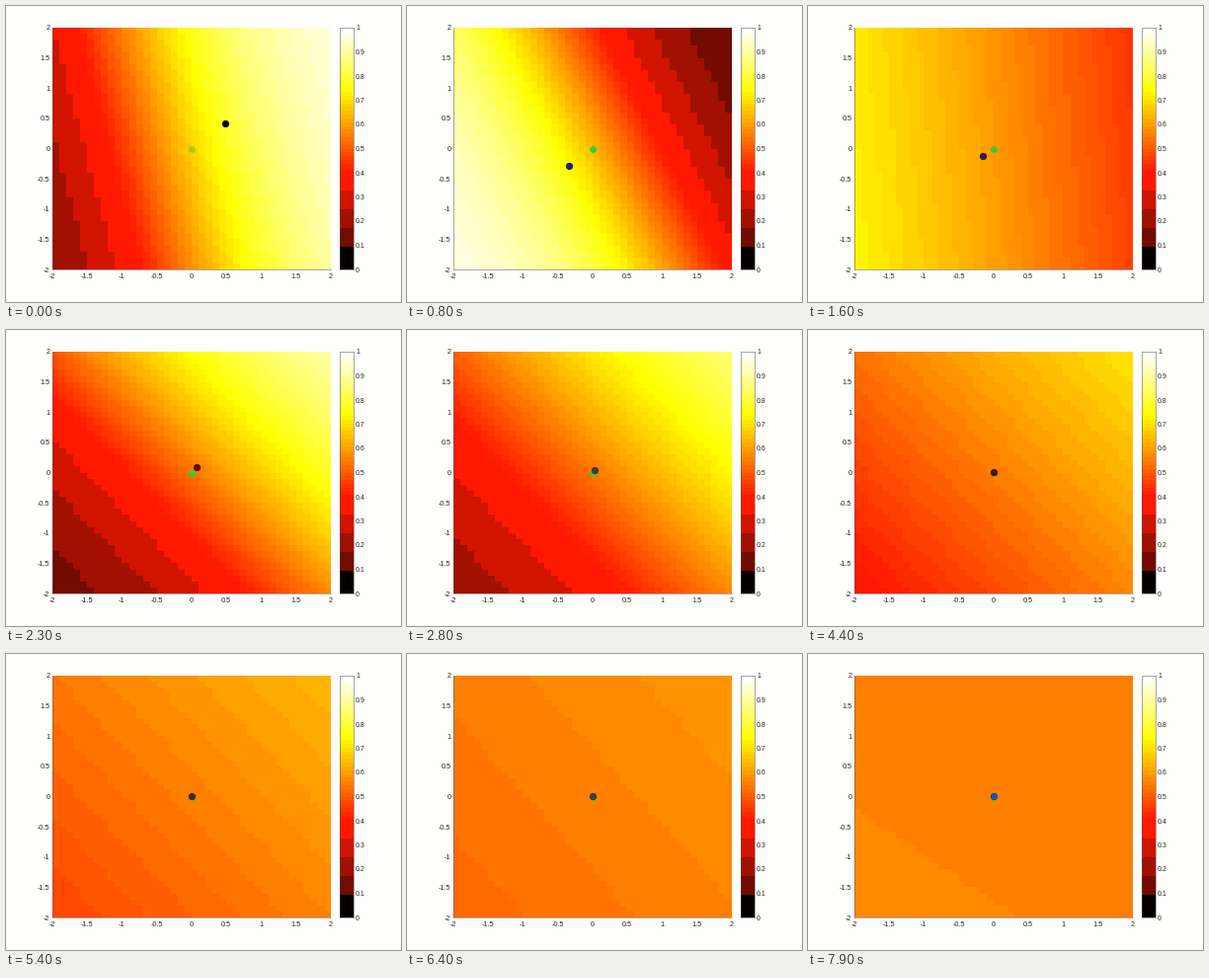
A matplotlib script that plays this animation: 400 px wide and 300 px high, repeating every 8 s.

```python
import numpy as np
import matplotlib.pyplot as plt
from matplotlib.animation import FuncAnimation
from matplotlib.colors import LinearSegmentedColormap, ListedColormap

W, H, DPI = 400, 300, 100
PX = 72 / DPI
STEP_MS, FRAMES = 100, 80
INK = "#262626"
PAPER = "#fefefc"

plt.rcParams["font.family"] = "Liberation Sans"
plt.rcParams["axes.unicode_minus"] = False

# Weight x, weight y, bias, dot x, dot y at the turning points and at rest.
START = np.array([0.95, 0.22, 0.74, 0.49, 0.41])
SWING = np.array([-0.97, -0.43, 0.58, -0.34, -0.29])
RETURN = np.array([0.56, 0.48, 0.14, 0.08, 0.09])
REST = np.array([-0.0575, -0.053, 0.242, 0, 0.01])
DECAY = np.array([0.045, 0.045, 0.045, 0.2, 0.2])
T_SWING, T_RETURN = 8, 23

# Slow first updates, then a steady pace (units of one step).
TICKS = np.r_[0, 1, 3, 5, T_SWING, np.round(np.arange(12, FRAMES, 1.625))]

DOT_COLORS = LinearSegmentedColormap.from_list("dot", [
    (0.00, "#000000"), (0.10, "#1e1e8c"), (0.29, "#5a0c14"),
    (0.43, "#1e7873"), (0.56, "#4b140f"), (0.81, "#324650"),
    (1.00, "#1e50be")])


def hot_map(n=64):
    """Black-red-yellow-white ramp whose dark end is in coarse bands."""
    k = np.arange(n)
    third = 3 * n // 8
    band = np.floor((k - 6) / 4.67)
    red = np.where(k < 6, 0.02, np.clip(0.45 + 0.185 * band, 0, 1))
    green = np.clip((k + 1 - third) / third, 0, 1)
    green = np.maximum(green, np.where(k < 6, 0, 0.1 * red))
    blue = np.clip((k + 1 - 2 * third) / (n - 2 * third), 0, 1)
    return ListedColormap(np.stack([red, green, blue], axis=1))


def ease(a, b, u):
    return a + (b - a) * (1 - np.cos(np.pi * u)) / 2


def state(t):
    """Two wide swings, then an exponential settling."""
    if t < T_SWING:
        return ease(START, SWING, t / T_SWING)
    if t < T_RETURN:
        return ease(SWING, RETURN, (t - T_SWING) / (T_RETURN - T_SWING))
    return REST + (RETURN - REST) * np.exp(-DECAY * (t - T_RETURN))


def add_axes(x0, y0, x1, y1):
    """Axes from pixel corners, y counted downward."""
    return fig.add_axes([x0 / W, 1 - y1 / H, (x1 - x0) / W, (y1 - y0) / H])


def show(ax, data, extent):
    return ax.imshow(data, cmap=cmap, vmin=0, vmax=1, origin="lower",
                     extent=extent, interpolation="nearest", aspect="auto")


def style(ax, size, color, sides):
    ax.tick_params(length=0, pad=2.6 * PX, labelsize=size * PX,
                   labelcolor=INK)
    for name, spine in ax.spines.items():
        spine.set_visible(name in sides)
        spine.set_linewidth(0.5 * PX)
        spine.set_color(color)


fig = plt.figure(figsize=(W / DPI, H / DPI), dpi=DPI, facecolor=PAPER)
cmap = hot_map()

ax = add_axes(47, 22, 328.5, 267)
mid = np.linspace(-1.95, 1.95, 40)
gx, gy = np.meshgrid(mid, mid)
field = show(ax, np.zeros_like(gx), (-2, 2, -2, 2))
marks = np.arange(-2, 2.1, 0.5)
labels = [f"{v:g}" for v in marks]
ax.set_xticks(marks, labels)
ax.set_yticks(marks, labels)
style(ax, 7.3, "#60504c", ("left", "bottom"))
ax.tick_params(axis="x", pad=4 * PX)

bar = add_axes(337.5, 22, 351.5, 267)
show(bar, np.linspace(0, 1, 64)[:, None], (0, 1, 0, 1))
levels = np.linspace(0, 1, 11)
bar.set_xticks([])
bar.set_yticks(levels, [f"{v:.1g}" for v in levels])
bar.yaxis.tick_right()
style(bar, 7, "#505050", ("left", "right", "top", "bottom"))

goal, = ax.plot([0], [0], "o", ms=6.8 * PX, mew=0)
dot, = ax.plot([0], [0], "o", ms=6.4 * PX, mew=0.8 * PX)


def draw(frame):
    t = TICKS[TICKS <= frame].max()
    wx, wy, bias, x, y = state(t)
    field.set_data(1 / (1 + np.exp(-(wx * gx + wy * gy + bias))))
    goal.set_color("#a8cc18" if t < 1 else "#34cc34")
    color = np.array(DOT_COLORS(t / (FRAMES - 1))[:3])
    dot.set_data([x], [y])
    dot.set_markerfacecolor(color)
    dot.set_markeredgecolor(color * 0.75)
    return field, goal, dot


anim = FuncAnimation(fig, draw, frames=FRAMES, interval=STEP_MS,
                     init_func=lambda: draw(0), repeat=True, repeat_delay=0)
plt.show()
```
